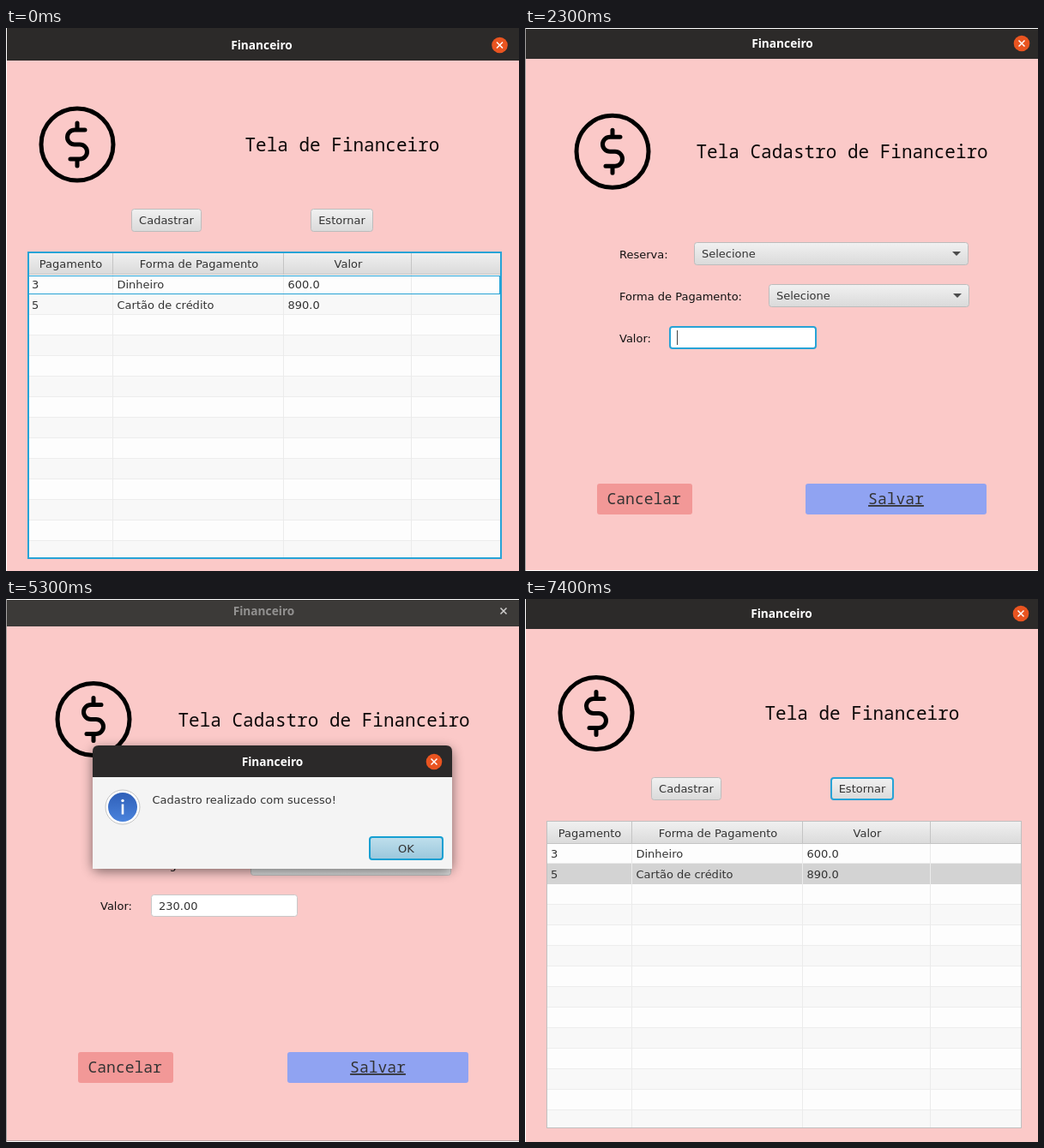
An HTML page for the animation above (8 s loop, 598x634 px).

```html
<!DOCTYPE html>
<html lang="pt-BR">
<head>
<meta charset="utf-8">
<title>Financeiro</title>
<style>
  html, body { margin: 0; width: 100%; height: 100%; overflow: hidden; background: #fff; }
  svg { display: block; }
  text { font: 13px "DejaVu Sans", sans-serif; fill: #333; white-space: pre; }
  .dark { fill: #111; }
  .mid { text-anchor: middle; }
  .bar { font: 700 13.7px "Noto Sans", "Open Sans", sans-serif; fill: #fff; text-anchor: middle; }
  .head { font: 21px "Noto Sans Mono", "DejaVu Sans Mono", monospace; fill: #0c0808; }
  .big { font: 18px "Noto Sans Mono", "DejaVu Sans Mono", monospace; fill: #333; }
  .u { text-decoration: underline; }
  #reel { animation: cut 8s step-end infinite; }
  @keyframes cut {
    0% { transform: translateY(0); }
    6.25% { transform: translateY(-634px); }
    43.75% { transform: translateY(-1268px); }
    81.25%, 100% { transform: translateY(-1902px); }
  }
</style>
</head>
<body>
<svg id="stage" width="598" height="634" viewBox="0 0 598 634">
  <defs>
    <linearGradient id="grey" x2="0" y2="1"><stop stop-color="#f1f1f1"/><stop offset="1" stop-color="#dadada"/></linearGradient>
    <linearGradient id="sky" x2="0" y2="1"><stop stop-color="#bfdfec"/><stop offset="1" stop-color="#9bc7dc"/></linearGradient>
    <linearGradient id="info" x2="0" y2="1"><stop stop-color="#2f5fb8"/><stop offset="1" stop-color="#4a83dc"/></linearGradient>
    <filter id="shade" x="-20%" y="-30%" width="140%" height="170%"><feGaussianBlur stdDeviation="7"/></filter>
    <g id="coin" fill="none" stroke="#000" stroke-width="5">
      <circle r="42"/>
      <path stroke-linecap="round" d="M9-17H-3a8.5 8.5 0 0 0 0 17h6a8.5 8.5 0 0 1 0 17H-8M0-25v7M0 18v7"/>
    </g>
    <path id="cross" d="M-3.5-3.5l7 7m0-7l-7 7" fill="none" stroke-width="1.5"/>
  </defs>
  <g id="reel"></g>
</svg>
<script>
const BLUE = '#27a3d6', PINK = '#fbc9c8', EDGE = '#bcbcbc';

const rect = (x, y, w, h, fill, extra = '') =>
  `<rect x="${x}" y="${y}" width="${w}" height="${h}" fill="${fill}" ${extra}/>`;
const text = (x, y, s, cls = '') => `<text x="${x}" y="${y}" class="${cls}">${s}</text>`;
const line = (d, color) => `<path d="${d}" stroke="${color}" fill="none"/>`;
const coin = (x, y) => `<use href="#coin" x="${x}" y="${y}"/>`;
const cross = (x, y, color) => `<use href="#cross" x="${x}" y="${y}" stroke="${color}"/>`;
const closeDot = (x, y) => `<circle cx="${x}" cy="${y}" r="9.3" fill="#e95420"/>` + cross(x, y, '#fff');

// Box with its border drawn inside the given bounds
const box = (x, y, w, h, fill, stroke = EDGE, sw = 1) =>
  rect(x + sw / 2, y + sw / 2, w - sw, h - sw, fill, `rx="3" stroke="${stroke}" stroke-width="${sw}"`);
const button = (x, y, w, label, focus) =>
  box(x, y, w, 27, 'url(#grey)', focus ? BLUE : EDGE, focus ? 2 : 1) +
  text(x + w / 2, y + 18, label, 'mid');
const combo = (x, y, w) =>
  box(x, y, w, 27, 'url(#grey)') + text(x + 9, y + 18, 'Selecione') +
  `<path d="M${x + w - 19} ${y + 11}h10l-5 5z" fill="#4c4c4c"/>`;

const titleBar = (bottom, cx, base, top = 0) =>
  rect(1, top, 597, bottom - top, '#2c2a29') + text(cx, base, 'Financeiro', 'bar');

function table(x, y, w, active) {
  const cols = [100, 299, 448], rows = y + 26, bottom = y + 359;
  let s = rect(x, y, w, 359, '#fdfdfd');
  for (let i = 0; i < 14; i++) {
    const top = rows + 24 * i, h = Math.min(24, bottom - top);
    const chosen = !active && i === 1;
    s += rect(x, top, w, h, chosen ? '#d3d3d3' : i % 2 ? '#f8f8f8' : '#fdfdfd');
    if (h === 24) s += line(`M${x} ${top + 23.5}h${w}`, chosen ? '#d3d3d3' : '#ededed');
  }
  s += rect(x, y, w, 27, 'url(#grey)') + line(`M${x} ${y + 26.5}h${w}`, '#c4c4c4');
  for (const c of cols)
    s += line(`M${x + c - .5} ${y + 1}v26`, '#c4c4c4') + line(`M${x + c - .5} ${y + 27}v331`, '#ebebeb');
  ['Pagamento', 'Forma de Pagamento', 'Valor'].forEach((t, i) =>
    s += text(x + [50.5, 200, 374][i], y + 19, t, 'mid'));
  [['3', 'Dinheiro', '600.0'], ['5', 'Cartão de crédito', '890.0']].forEach((r, j) =>
    r.forEach((t, i) => s += text(x + [5, 104.5, 303.5][i], y + 43 + 24 * j, t)));
  if (active) s += rect(x + 1.5, y + 28.5, w - 4, 21, 'none', `stroke="${BLUE}"`);
  const sw = active ? 2 : 1;
  return s + rect(x + sw / 2, y + sw / 2, w - sw, 359 - sw, 'none',
    `stroke="${active ? BLUE : '#c0c0c0'}" stroke-width="${sw}"`);
}

function list(active) {
  const dx = active ? 0 : 1, dy = active ? 0 : -2.5, by = active ? 211 : 208;
  return rect(1, 0, 597, 634, PINK) +
    (active ? titleBar(38, 298, 24.5) + closeDot(575.5, 20) : titleBar(35, 299, 21.5) + closeDot(578, 17)) +
    coin(83, 136 + dy) + text(278.5 + dx, 143.5 + dy, 'Tela de Financeiro', 'head') +
    button(146 + dx, by, 82, 'Cadastrar') +
    button(355 + dx, by, active ? 73 : 74, 'Estornar', !active) +
    table(25, active ? 261 : 259, active ? 553 : 554, active);
}

function form(saved) {
  const dx = saved ? 1 : 0, dy = saved ? -3 : 0;
  const bar = saved
    ? rect(1, 1, 597, 31, '#3c3a38') + `<text x="300.5" y="19" class="bar" style="fill:#929190">Financeiro</text>` + cross(580, 14, '#d0cfce')
    : titleBar(36, 300, 22.5, 1) + closeDot(579, 18);
  const field = saved
    ? box(169, 345, 171, 26, '#fff', '#c8c8c8') + text(178, 363, '230.00')
    : box(168, 348, 172, 27, '#fff', BLUE, 2) + line('M177.5 353v17', '#444');
  return rect(0, 0, 1, 634, '#a5a3a3') + rect(1, 1, 597, 632, PINK) + bar +
    coin(102, saved ? 140.5 : 144.3) + text(199.5 + dx, saved ? 148.5 : 152, 'Tela Cadastro de Financeiro', 'head') +
    text(110, 269 + dy, 'Reserva:', 'dark') + combo(197 + dx, 250 + dy, 320) +
    text(110, 318 + dy, 'Forma de Pagamento:', 'dark') + combo(284 + dx, 299 + dy, 234) +
    text(110, saved ? 363 : 366.5, 'Valor:', 'dark') + field +
    rect(84, 532 + dy, 111, 36, '#f29897', 'rx="3"') + text(95.5, 556 + dy, 'Cancelar', 'big') +
    rect(327 + dx, 532 + dy, 211, 36, '#90a3f2', 'rx="3"') + text(432.5 + dx, 556 + dy, 'Salvar', 'big mid u') +
    (saved ? rect(0, 632, 598, 1, '#b9a3a2') + dialog() : '');
}

const dialog = () =>
  rect(101, 175, 419, 143, '#000', 'rx="7" opacity=".5" filter="url(#shade)"') +
  rect(101, 200, 419, 115, '#f4f4f4') +
  `<path d="M101 208v-30q0-7 7-7h405q7 0 7 7v30z" fill="#2b2929"/>` +
  text(310.5, 195, 'Financeiro', 'bar') + closeDot(499, 190) +
  `<circle cx="136" cy="243" r="20" fill="#fff" stroke="#c4c4c4"/>
   <circle cx="136" cy="243" r="17" fill="url(#info)"/>
   <circle cx="136" cy="235.5" r="1.7" fill="#fff"/>` +
  rect(134.7, 239.5, 2.6, 12, '#fff') +
  text(170.5, 239, 'Cadastro realizado com sucesso!') +
  box(423, 277, 87, 28, 'url(#sky)', '#159fd2', 2) + text(466.5, 296, 'OK', 'mid');

document.getElementById('reel').innerHTML = [list(true), form(false), form(true), list(false)]
  .map((scene, i) => `<svg y="${i * 634}" width="598" height="634" overflow="hidden">${scene}</svg>`).join('');
</script>
</body>
</html>
```
